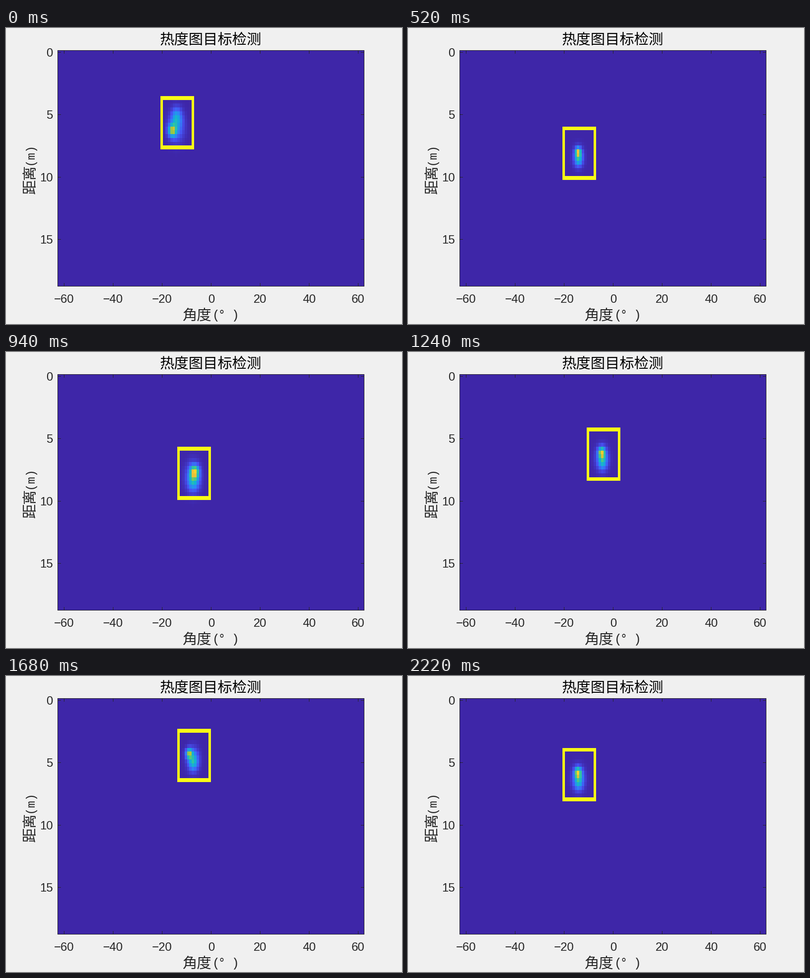
These frames come from a looping animation (800 px wide and 600 px high, 2240 ms). A matplotlib script:

```python
import numpy as np
import matplotlib.pyplot as plt
from matplotlib.animation import FuncAnimation
from matplotlib.colors import LinearSegmentedColormap

W, H, DPI = 800, 600, 100
FRAMES, INTERVAL = 112, 20
LEFT, RIGHT, TOP, BOTTOM = 104.5, 723.5, 45.5, 523.5
COLS, ROWS, BOX = 128, 62, 14
INK = "#262626"
CJK, SANS, MONO = "Noto Sans CJK JP", "Liberation Sans", "Liberation Mono"

HEAT = LinearSegmentedColormap.from_list("heat", [
    "#3e26a8", "#4852f4", "#2e87f7", "#12b1d6",
    "#37c897", "#abc739", "#fec338", "#f9fb15"], N=256)

# Turning points of the walk: time step, left column and top row of the box
WALK = np.array([(0, 43, 12), (26, 43, 20), (30, 44, 21), (47, 50, 19),
                 (54, 53, 17), (62, 53, 14), (84, 50, 8), (99, 46, 8),
                 (111, 43, 13)])

yy, xx = np.mgrid[0:ROWS, 0:COLS]


def cell_index(start, end, count):
    """Grid cell under each screen pixel from start to end."""
    pixels = np.arange(int(start), int(end) + 1) + .5
    cells = np.floor((pixels - start) / (end - start) * count)
    return np.clip(cells, 0, count - 1).astype(int)


PIXELS = np.ix_(cell_index(TOP, BOTTOM, ROWS), cell_index(LEFT, RIGHT, COLS))


def box_at(i):
    return [int(round(np.interp(i, WALK[:, 0], WALK[:, k]))) for k in (1, 2)]


def lobe(x, y, sx, sy):
    return np.exp(-((xx - x) / sx) ** 2 / 2 - ((yy - y) / sy) ** 2 / 2)


def heat_at(i):
    """A hot core that sways, a trailing spot and a halo, inside the box."""
    col, row = box_at(i)
    start = np.exp(-i / 10)
    size = 1 + .18 * np.cos(2 * np.pi * i / 49)
    sway = 5.6 - 1.2 * np.cos(2 * np.pi * i / 86)
    heat = (.62 * lobe(col + sway, row + 6 + 2.5 * start, size, .95 * size)
            + .28 * lobe(col + 6.2, row + 8.3 - 3.3 * start, 1.2 * size, 1.4 * size)
            + .27 * lobe(col + 6, row + 7.5, 1.8 * size, 2.2 * size))
    heat = np.minimum(heat, .9)
    right, low = col + BOX - 1, row + BOX - 1
    heat[[row, low], col:right + 1] = 1
    heat[row:low + 1, [col, right]] = 1
    return heat[PIXELS]


fig = plt.figure(figsize=(W / DPI, H / DPI), dpi=DPI, facecolor="#f0f0f0")
ax = fig.add_axes([0, 0, 1, 1])
image = ax.imshow(heat_at(0), cmap=HEAT, vmin=0, vmax=1, aspect="auto",
                  interpolation="nearest",
                  extent=(LEFT - .5, RIGHT + .5, BOTTOM + .5, TOP - .5))
ax.set_xlim(0, W)
ax.set_ylim(H, 0)
ax.axis("off")


def label(x, y, text, font, px, color=INK, ha="center", rotation=0):
    ax.text(x, y, text, family=font, size=px * 72 / DPI, color=color, ha=ha,
            va="baseline", rotation=rotation, rotation_mode="anchor")


def line(xs, ys):
    ax.plot(xs, ys, color=INK, lw=.72, snap=False,
            solid_capstyle="projecting", solid_joinstyle="miter")


line([LEFT, RIGHT, RIGHT, LEFT, LEFT], [TOP, TOP, BOTTOM, BOTTOM, TOP])
for angle in range(-60, 61, 20):
    x = int(414 + 4.95 * angle) + .5
    line([x, x], [TOP, TOP + 6])
    line([x, x], [BOTTOM, BOTTOM - 6])
    label(x, 557, str(angle).replace("-", "\u2212"), SANS, 24)
for metres in range(0, 16, 5):
    y = int(49.2 + 25.3 * metres) + .5
    line([LEFT, LEFT + 6], [y, y])
    line([RIGHT, RIGHT - 6], [y, y])
    label(95, y + 8.5, str(metres), SANS, 24, ha="right")

label(413.5, 33, "热度图目标检测", CJK, 29.4, color="black")
label(385.5, 593, "角度", CJK, 29.4)
label(424, 590, "(", MONO, 25)
label(436, 590, "°", SANS, 25)
label(463, 590, ")", MONO, 25)
label(58, 306.5, "距离", CJK, 29.4, rotation=90)
label(55, 255.5, "(m)", MONO, 24, rotation=90)


def update(i):
    image.set_data(heat_at(i))
    return [image]


anim = FuncAnimation(fig, update, frames=FRAMES, interval=INTERVAL,
                     repeat=True, repeat_delay=0, blit=False)
plt.show()
```
